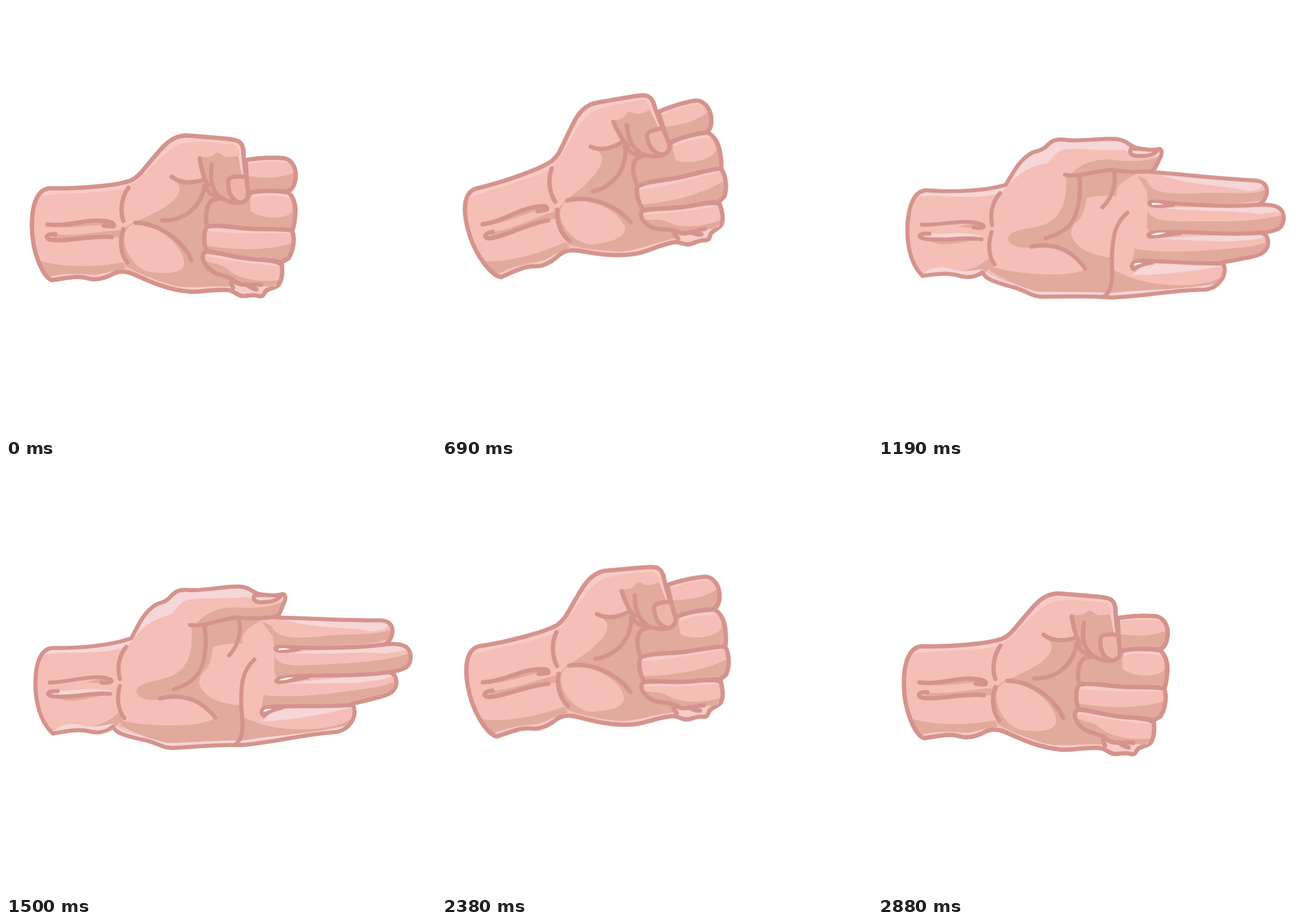
Animation, 748 px wide and 748 px high, one loop 3.03 s. Source, as an HTML page:

```html
<!DOCTYPE html>
<html lang="en">
<head>
<meta charset="utf-8">
<title>Hand game</title>
<style>
  html, body { margin: 0; width: 100%; height: 100%; overflow: hidden; background: #fff; }
  svg { display: block; width: 100vw; height: 100vh; }
  .hand {
    transform-origin: 70px 385px;
    animation: swing 3030ms cubic-bezier(.333, 0, .667, 1) infinite;
  }
  .fist { animation: fist 3030ms step-end infinite; }
  .palm { animation: palm 3030ms step-end infinite; }

  @keyframes swing {
    0% { transform: rotate(0deg); }
    9.1% { transform: rotate(-14.3deg); }
    17.9% { transform: rotate(6.8deg); }
    26.4% { transform: rotate(-28deg); animation-timing-function: cubic-bezier(.4, 0, .67, .6); }
    32% { transform: rotate(0deg); animation-timing-function: cubic-bezier(.33, .7, .67, 1); }
    35.6% { transform: rotate(10deg); }
    42.9% { transform: rotate(-3.5deg); }
    49.3%, 71.22% { transform: rotate(0deg); }
    75.7% { transform: rotate(-25.2deg); }
    82.35% { transform: rotate(13.2deg); }
    89.8% { transform: rotate(-8deg); }
    94.7%, 100% { transform: rotate(0deg); }
  }
  @keyframes fist {
    0%, 74.75% { visibility: visible; }
    27.5% { visibility: hidden; }
  }
  @keyframes palm {
    0%, 74.75% { visibility: hidden; }
    27.5% { visibility: visible; }
  }

  path { stroke-linecap: round; stroke-linejoin: round; }
  .skin { fill: #f5beb7; }
  .shade { fill: #e2a99d; }
  .glow { fill: #f8cbc7; }
  .palm .glow { fill: #f6d6d7; }
  .nail { fill: #edb5a9; }
  .line { fill: none; stroke: #d5938d; stroke-width: 7.5; }
  .palm .line { stroke-width: 7; }
  .gap { fill: #fff; }
</style>
</head>
<body>
<svg viewBox="0 0 748 748">
  <defs>
    <path id="fistShape" d="M78 317C125 318 190 313 216 304C232 297 239 284 254 267C271 247 286 226 313 225C335 227 365 229 392 232C410 234 414 242 413 262L400 420L480 449C481 462 481 474 474 485C468 491 456 491 451 497C447 505 444 506 437 504C426 501 418 506 409 504C400 502 397 495 385 494C360 492 340 498 320 497C280 494 245 477 225 468C210 461 199 460 188 465C172 474 158 478 143 474C125 468 105 473 80 477C65 472 45 430 45 382C45 340 57 317 78 317Z"/>
    <path id="indexShape" d="M417 268C440 264 465 263 485 265C500 269 505 285 504 298C502 315 495 323 485 323C465 320 440 322 420 325Z"/>
    <path id="middleShape" d="M356 340C368 330 400 340 425 325C445 320 475 322 490 324C502 332 505 350 503 365C502 380 500 386 498 391C488 388 465 388 440 388C400 388 375 379 350 384C346 365 348 350 356 340Z"/>
    <path id="ringShape" d="M350 384C375 379 400 388 440 388C465 388 488 388 498 391C503 405 500 425 492 438C488 442 483 444 478 446C470 443 455 442 440 441C400 440 365 426 350 427C343 415 343 392 350 384Z"/>
    <path id="pinkyShape" d="M346 428C365 426 400 440 440 441C465 443 478 446 480 452C482 465 478 480 468 488L440 487C425 488 410 490 398 479C392 472 380 470 365 465C345 455 337 436 346 428Z"/>
    <path id="palmShape" d="M80 320C130 321 185 315 218 303C228 285 238 258 262 244C270 241 278 240 285 232C293 223 300 218 314 219C340 222 375 213 405 213C428 214 428 226 445 227C460 230 475 228 482 226C488 228 486 238 483 243C478 255 476 262 470 267C520 268 580 272 650 272C668 272 674 282 672 295C670 305 664 312 658 314C675 312 690 313 697 319C707 328 706 345 697 353C688 359 676 361 666 362C676 364 680 372 679 384C676 396 667 401 652 405C636 409 618 414 602 417C608 425 608 440 600 450C592 462 580 467 565 467C510 472 460 485 410 489C370 487 320 493 288 494C273 494 264 486 245 481C225 477 205 472 196 467C190 464 188 461 186 457C175 466 160 469 145 465C120 460 100 466 82 469C60 450 51 415 51 380C52 340 62 322 80 320Z"/>
    <clipPath id="fistClip"><use href="#fistShape"/></clipPath>
    <clipPath id="indexClip"><use href="#indexShape"/></clipPath>
    <clipPath id="middleClip"><use href="#middleShape"/></clipPath>
    <clipPath id="ringClip"><use href="#ringShape"/></clipPath>
    <clipPath id="pinkyClip"><use href="#pinkyShape"/></clipPath>
    <clipPath id="palmClip"><use href="#palmShape"/></clipPath>
  </defs>

  <g class="hand">
    <g class="fist">
      <g clip-path="url(#fistClip)">
        <use href="#fistShape" class="glow"/>
        <path class="skin" d="M40 335C80 322 150 329 205 318C238 305 266 258 300 241C330 231 375 241 395 240C405 244 405 255 408 270L500 300L480 470L440 484L395 486C350 487 320 493 300 488C260 478 230 465 205 457C180 460 165 468 150 469C110 464 90 467 75 471L40 460Z"/>
        <path class="shade" d="M50 440C90 455 145 456 204 446L209 457C180 460 165 469 150 467C110 464 90 467 65 473Z"/>
        <path class="shade" d="M76 384C115 384 140 374 172 375L186 381C150 379 120 388 76 384ZM84 397C120 402 160 392 198 390L201 403C150 398 110 411 80 407Z"/>
        <path class="shade" d="M222 376C260 362 300 340 302 320C303 312 298 309 296 304C312 310 325 306 340 304L365 320L360 400L390 470V488C340 487 320 492 290 486C250 474 225 462 208 452C200 430 198 410 204 388Z"/>
        <path class="skin" d="M206 403C207 384 222 372 242 382C285 393 310 428 310 447C308 466 280 466 250 463C228 458 206 432 206 403Z"/>
        <path class="shade" d="M338 262C346 264 358 264 364 256C372 252 376 262 384 263C394 264 398 260 404 262L413 300L420 335L400 343C370 338 345 318 338 262Z"/>
      </g>
      <use href="#fistShape" class="line"/>

      <g clip-path="url(#indexClip)">
        <use href="#indexShape" class="skin"/>
        <path class="glow" d="M415 264H495V274C470 267 440 272 415 275Z"/>
        <path class="shade" d="M412 294C445 301 485 301 506 286V328H415Z"/>
      </g>
      <use href="#indexShape" class="line"/>

      <g clip-path="url(#middleClip)">
        <use href="#middleShape" class="shade"/>
        <path class="skin" d="M425 335L440 322H490C499 340 500 355 496 360C480 373 440 369 425 356Z"/>
        <path class="glow" d="M428 325H492L494 335C470 328 445 329 427 334Z"/>
      </g>
      <use href="#middleShape" class="line"/>

      <g clip-path="url(#ringClip)">
        <use href="#ringShape" class="skin"/>
        <path class="glow" d="M350 384C400 392 450 390 498 390V396C450 394 400 398 350 391Z"/>
        <path class="shade" d="M345 416C390 424 450 428 503 411V448H345Z"/>
      </g>
      <use href="#ringShape" class="line"/>

      <g clip-path="url(#pinkyClip)">
        <use href="#pinkyShape" class="skin"/>
        <path class="glow" d="M348 429C390 438 440 445 478 447V453C430 449 385 442 347 435Z"/>
        <path class="shade" d="M340 440C355 448 374 447 388 460C402 473 440 482 476 477L465 488L438 496L395 485L345 460Z"/>
      </g>
      <path class="line" d="M480 452C478 446 465 443 440 441C400 440 365 426 346 428C337 436 345 455 365 465C380 470 392 472 398 479C410 489 428 483 444 485M391 475C391 482 393 487 395 490M418 484C424 489 429 492 436 493M480 452C481 465 480 477 474 485"/>

      <path class="shade" d="M358 276C354 305 358 325 378 336C395 345 424 349 421 325L412 262L385 263Z"/>
      <path class="glow" d="M404 262L412 258L417 297H411Z"/>
      <path class="nail" d="M416 297C397 295 387 298 387 306C386 325 392 336 403 340L420 336Z"/>
      <path class="line" d="M413 250C413 280 420 305 421 326C422 347 395 345 378 336C358 325 354 305 358 276M414 297C395 295 386 298 387 306C386 325 392 336 404 341"/>

      <path class="line" d="M213 316C203 330 197 352 204 374M204 388C198 405 198 430 211 446M72 380C110 384 140 370 170 374C182 375 190 378 187 383C182 384 176 383 170 382M86 397C70 396 68 403 75 406C100 412 150 398 184 402M225 377C265 378 305 405 322 441M272 373C305 374 338 355 346 312M288 297C305 310 325 308 345 302M337 265C340 285 345 303 352 312M345 312C350 318 352 327 363 330"/>
    </g>

    <g class="palm">
      <g clip-path="url(#palmClip)">
        <use href="#palmShape" class="glow"/>
        <path class="skin" d="M40 337C100 320 150 337 210 318C228 300 240 272 288 262C298 250 302 240 318 236C350 232 390 235 420 231C450 246 470 242 490 234L486 262L720 250V420L610 447C560 465 480 470 410 481C350 480 300 486 275 484C240 474 210 468 190 455L82 464L40 460Z"/>
        <path class="shade" d="M140 458C170 455 185 442 196 432L206 444L190 457C170 459 155 460 140 458ZM140 380C155 375 168 373 180 376V382ZM85 404C125 404 150 400 180 401C150 404 120 418 95 409Z"/>
        <path class="glow" d="M78 377C115 374 150 359 182 371C150 368 120 378 78 382ZM86 394C115 397 150 385 182 395V401C150 395 115 407 80 403ZM80 468C92 453 113 448 135 455C155 460 172 453 188 452L190 470H80Z"/>
        <path class="shade" d="M328 281C348 256 375 247 410 250C440 250 460 250 486 238C478 255 474 262 468 266C430 269 400 268 375 275Z"/>
        <path class="shade" d="M322 280C326 320 322 350 290 368C260 380 230 378 227 396C232 415 265 412 300 405C335 406 352 422 364 440C352 457 260 460 198 446L200 455C225 468 250 478 280 485C300 486 350 481 410 481C480 470 550 468 602 452L606 440C580 460 530 464 480 460C450 456 430 448 412 440L410 420C385 418 365 414 350 402C338 390 330 380 342 364C354 352 358 340 360 318C380 312 400 312 412 312C407 295 424 282 445 272L402 266Z"/>
        <path class="shade" d="M463 282C468 302 500 304 540 301C600 292 650 302 674 284V298C665 312 600 318 470 322C462 312 466 300 463 282ZM466 330C470 352 500 352 540 349C600 347 660 344 706 328C706 350 690 358 665 362C600 370 520 366 475 374C460 362 470 350 466 330ZM448 402C500 407 540 402 590 396C630 390 660 388 682 375C678 405 650 412 600 420C550 424 500 420 460 424L443 436Z"/>
        <path class="shade" d="M445 274L463 282L464 300Z"/>
        <path class="glow" d="M485 271C540 288 610 283 634 291C660 292 668 280 662 275C600 272 540 272 485 271ZM490 328C550 333 620 325 660 330C680 326 695 326 697 322C680 312 650 316 600 320ZM475 383C540 380 600 384 630 378C660 376 672 370 672 368C650 362 600 370 560 374ZM446 448C490 446 540 437 570 431L600 424C560 420 500 425 465 428Z"/>
      </g>
      <path class="line" d="M658 314C600 322 520 320 476 318C466 318 467 325 476 325C485 326 495 325 510 322M666 362C600 372 530 364 480 372C466 374 468 381 480 379C495 377 510 373 525 371M602 419C555 423 500 420 460 422C445 422 441 433 448 438C455 431 465 427 480 424"/>
      <path class="gap" d="M474 321C482 320 490 321 495 322L474 324ZM475 376C482 372 492 371 500 371C492 375 482 377 475 376ZM448 431C448 426 456 425 462 427Z"/>
      <use href="#palmShape" class="line"/>
      <path class="glow" d="M432 229C427 239 440 242 450 240C466 240 475 235 480 227C468 231 446 226 432 229Z"/>
      <path class="line" d="M432 229C427 239 440 242 450 240C466 240 475 235 480 227C468 231 446 226 432 229Z"/>
      <path class="line" d="M320 280C345 284 370 270 402 267C430 270 450 268 468 266M345 282C350 310 348 350 330 370C318 382 305 388 292 392M405 270C410 290 405 315 388 333M432 340C405 365 410 400 409 420C412 450 415 475 400 487M268 408C300 400 335 405 364 441M209 318C198 332 192 350 198 374M198 386C192 405 195 430 206 442M76 380C110 380 150 364 180 374C187 377 184 382 166 380M90 395C70 394 70 402 80 404C115 408 150 396 181 400"/>
    </g>
  </g>
</svg>
</body>
</html>
```
